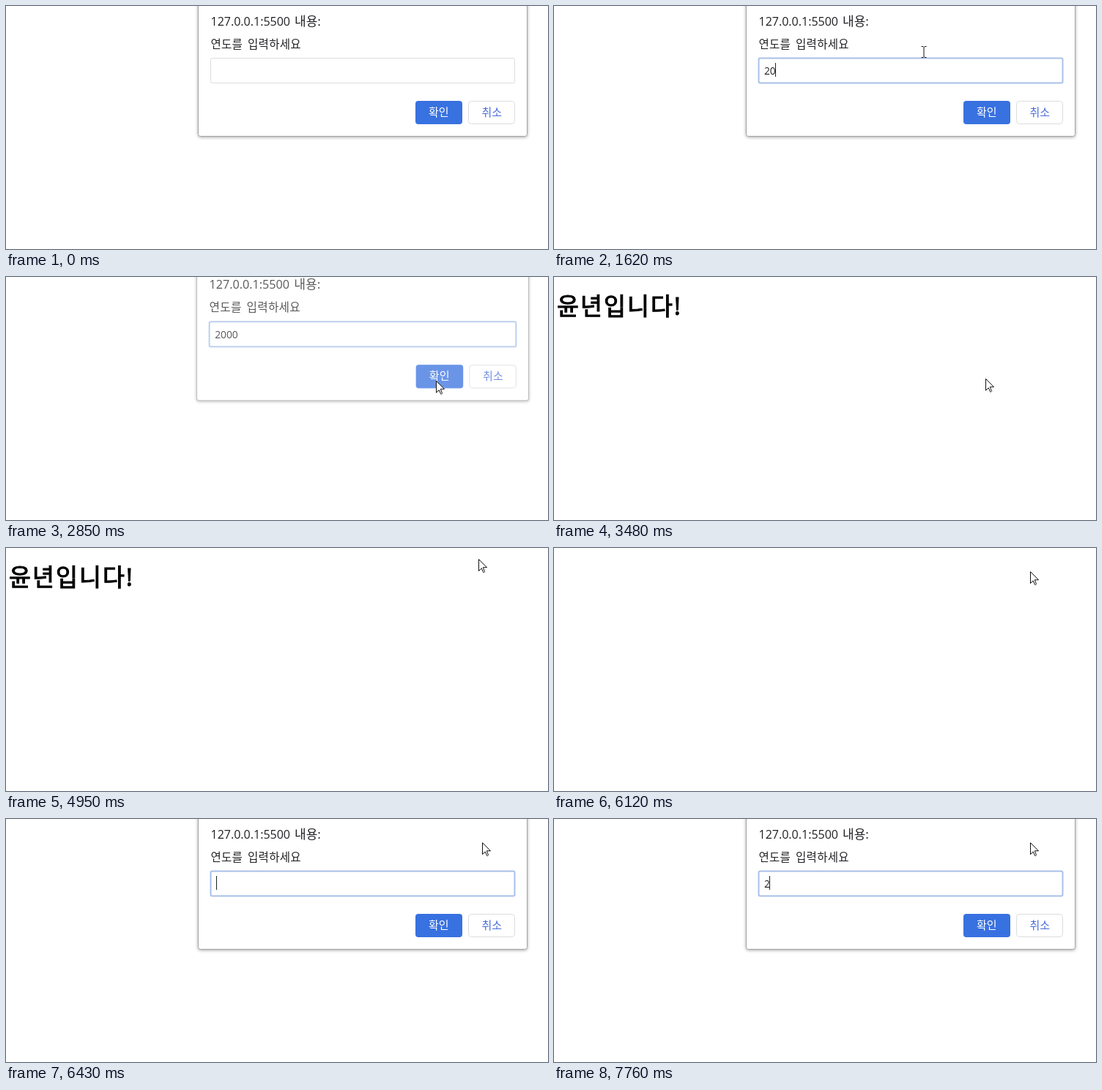
Recreate the animation shown at these times as an HTML page. Size 740x333 px, loop 7.99 s.

```html
<!DOCTYPE html>
<html lang="ko">
<head>
<meta charset="utf-8">
<style>
  html, body { margin: 0; width: 100%; height: 100%; overflow: hidden; background: #fff; }
  svg { display: block; width: 740px; height: 333px; }
  text { font-family: 'Open Sans', 'Noto Sans CJK KR', 'Noto Sans CJK', sans-serif; fill: #202124; white-space: pre; }
  .box { filter: drop-shadow(0 1px 2px rgba(0, 0, 0, .35)); }
  #result { fill: #000; stroke: #000; stroke-width: 1.1px; }
</style>
</head>
<body>
<svg viewBox="0 0 740 333">
  <text id="result" x="4" y="52" font-size="32.5" letter-spacing="2.1">윤년입니다!</text>
  <g id="dialog">
    <rect class="box" x="262.5" y="-20" width="449" height="198.5" rx="3" fill="#fff" stroke="#a6a6a6"/>
    <text x="279.5" y="27" font-size="16">127.0.0.1:5500 <tspan x="394" font-size="17">내용:</tspan></text>
    <text x="279.5" y="57.5" font-size="15.5" letter-spacing=".3" word-spacing="2.5">연도를 입력하세요</text>
    <rect id="field" x="279.5" y="71.5" width="415" height="34" rx="2" fill="#fff"/>
    <text id="typed" x="287" y="94" font-size="13.7"></text>
    <path id="caret" d="M0 78V97" stroke="#222"/>
    <rect x="559" y="130" width="64" height="32" rx="4" fill="#3871e0"/>
    <text x="577" y="151" font-size="15" style="fill:#fff">확인</text>
    <rect x="631.5" y="130.5" width="63" height="31" rx="4" fill="#fff" stroke="#dadce0"/>
    <text x="649.5" y="151" font-size="15" style="fill:#4a6bd8">취소</text>
  </g>
  <g id="mouse">
    <path id="arrow" d="M.5 .5V16.5L4.2 12.9L6.8 18.5H7.6L8.6 17.5L6.3 11.7H11.5Z" fill="#fff" stroke="#111" stroke-linejoin="round"/>
    <path id="beam" d="M-3.5 -7.5H-1L0 -6.5L1 -7.5H3.5M0 -6.5V6.5M-3.5 7.5H-1L0 6.5L1 7.5H3.5" fill="none" stroke="#111"/>
    <circle id="press" r="12.5" fill="#faf014" fill-opacity=".55"/>
  </g>
</svg>
<script>
const LOOP = 7990, TICK = 76, BLINK = 545;
const CLICK = 690, KEY = 1450, SUBMIT = 2700, CLOSE = 2780, RELOAD = 6115, LAST_KEY = 7760;

const $ = id => document.getElementById(id);
const set = (id, attrs) => { for (const k in attrs) $(id).setAttribute(k, attrs[k]); };
const show = (id, on) => set(id, { visibility: on ? 'visible' : 'hidden' });
const clamp = (v, lo, hi) => Math.min(hi, Math.max(lo, v));

const progress = (t, a, b) => clamp(Math.floor((t - a + 8) / TICK) * TICK / (b - a), 0, 1);

// Pointer glides: start, end, Bezier points
const glides = [
  [300, 830, [560, 160], [500, 30], [486, 77]],
  [990, 1070, [495, 70], [505, 63]],
  [2240, 2700, [510, 68], [585, 120], [587, 142]],
  [3480, 3640, [589, 139], [800, 420]],
  [4190, 4570, [546, 151], [640, -10], [639, 1]],
  [4950, 5410, [645, 15], [650, 60], [650, 32]]
];

function bezier(pts, u) {
  while (pts.length > 1) {
    pts = pts.slice(1).map((p, i) => p.map((v, k) => pts[i][k] + (v - pts[i][k]) * u));
  }
  return pts[0];
}

function pointer(t) {
  const glide = glides.filter(g => g[0] <= t).pop();
  if (!glide) return [-50, -50];
  const [start, end, ...pts] = glide;
  return bezier(pts, progress(t, start, end)).map(Math.round);
}

function drawDialog(t) {
  const reloaded = t >= RELOAD;
  const open = reloaded ? progress(t, RELOAD, RELOAD + 210) : 1 - progress(t, CLOSE, CLOSE + 150);
  const away = 1 - open;
  set('dialog', {
    opacity: 1 - away * away,
    transform: `translate(487 ${90 - 20 * away}) scale(${1 + .018 * away}) translate(-487 -90)`
  });
  show('result', t >= CLOSE + 150 && !reloaded);

  const firstKey = reloaded ? LAST_KEY : KEY;
  const count = clamp(Math.floor((t - firstKey) / 160) + 1, 0, 4);
  $('typed').textContent = '2000'.slice(0, count);

  // The caret restarts its blink at focus and at each key
  const focus = reloaded ? RELOAD : CLICK + 65;
  const since = t - (count ? firstKey + (count - 1) * 160 : focus);
  set('caret', { transform: `translate(${Math.floor(287 + count * 7.9) + .5} 0)` });
  show('caret', open > 0 && t >= focus && since % (2 * BLINK) < BLINK);

  const focused = t >= focus;
  set('field', { stroke: focused ? '#a9c0ea' : '#dadce0', 'stroke-width': focused ? 2 : 1 });
}

function drawPointer(t) {
  const [x, y] = pointer(t);
  const beam = t < SUBMIT && y < 107;
  set('mouse', { transform: `translate(${x} ${y})` });
  show('beam', beam);
  show('arrow', !beam);
  show('press', [CLICK, SUBMIT].some(c => t >= c && t < c + 145));
}

function frame() {
  const t = performance.now() % LOOP;
  drawDialog(t);
  drawPointer(t);
  requestAnimationFrame(frame);
}
frame();
</script>
</body>
</html>
```
